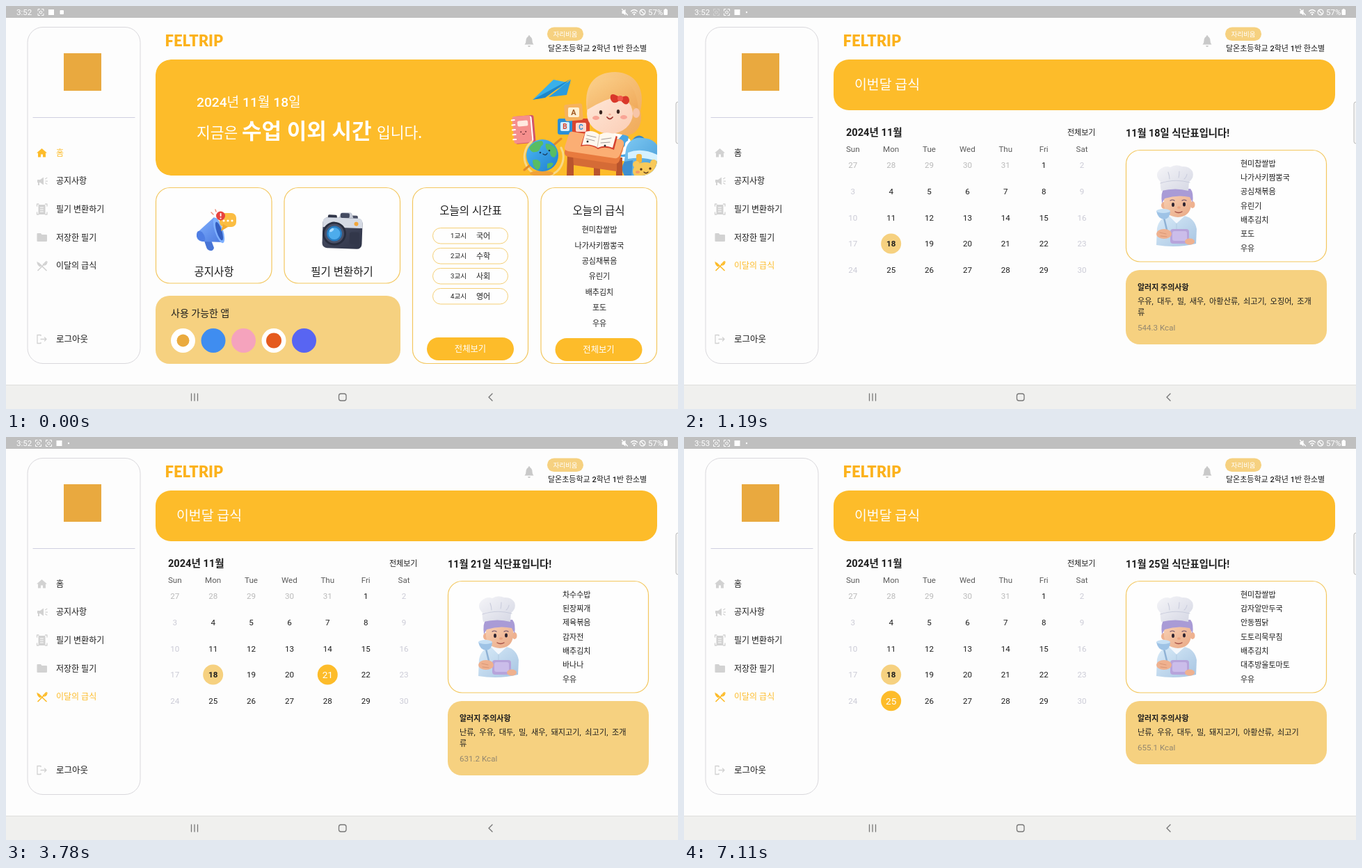
An HTML page for the animation above (7.48 s loop, 966 px wide and 580 px high).

```html
<!DOCTYPE html>
<html lang="ko">
<head>
<meta charset="utf-8">
<title>School tablet</title>
<style>
html, body { margin: 0; width: 100%; height: 100%; overflow: hidden; background: #fdfdfd; }
svg { display: block; width: 966px; height: 580px; }
text { font-family: Roboto, 'Noto Sans CJK KR', 'Noto Sans CJK', sans-serif; white-space: pre; }
</style>
</head>
<body>
<svg id="stage" viewBox="0 0 966 580" xmlns="http://www.w3.org/2000/svg"></svg>
<script>
const LOOP = 7480, OPEN = 1040, FADE = 190;
const GOLD = '#fdbc2a', PALE = '#f6d180', INK = '#1d1d1d', GREY = '#d2d2d2';
const $ = id => document.getElementById(id);

// y is the middle of the line
const txt = (s, x, y, size, fill = INK, weight = 400, anchor = 'start', more = '') =>
  `<text x="${x}" y="${y + size * 0.36}" font-size="${size}" fill="${fill}" font-weight="${weight}" text-anchor="${anchor}" ${more}>${s}</text>`;
const mid = (s, x, y, size, fill, weight) => txt(s, x, y, size, fill, weight, 'middle');
const box = (x, y, w, h, r, fill, stroke = 'none', more = '') =>
  `<rect x="${x}" y="${y}" width="${w}" height="${h}" rx="${r}" fill="${fill}" stroke="${stroke}" ${more}/>`;
const dot = (x, y, r, fill, more = '') => `<circle cx="${x}" cy="${y}" r="${r}" fill="${fill}" ${more}/>`;
const oval = (x, y, a, b, fill, more = '') => `<ellipse cx="${x}" cy="${y}" rx="${a}" ry="${b}" fill="${fill}" ${more}/>`;
const shape = (d, fill, more = '') => `<path d="${d}" fill="${fill}" ${more}/>`;
const line = (d, stroke, w = 1, more = '') =>
  `<path d="${d}" fill="none" stroke="${stroke}" stroke-width="${w}" stroke-linecap="round" stroke-linejoin="round" ${more}/>`;
const group = (id, body, more = '') => `<g id="${id}" ${more}>${body}</g>`;
const grad = (id, a, b) =>
  `<linearGradient id="${id}" x1="0" y1="0" x2="1" y2="1"><stop stop-color="${a}"/><stop offset="1" stop-color="${b}"/></linearGradient>`;

const capture = x =>
  line(`M${x - 4} 7v-2.5h2.5M${x + 4} 7v-2.5h-2.5M${x - 4} 11v2.5h2.5M${x + 4} 11v2.5h-2.5`, '#fff', 1);
const eye = x => `<circle cx="${x}" cy="9" r="1.9" fill="none" stroke="#fff"/>`;

function statusBar() {
  return box(0, 0, 966, 17, 0, '#bfbfbf') +
    txt('3:52', 15, 9, 11.5, '#fff', 400, 'start', 'id="clock"') +
    group('tray0', capture(50) + eye(50) + box(61, 5, 8, 8, 0, '#fff') + box(77.5, 6, 5.5, 6, 1, '#fff')) +
    group('tray1', group('cap', capture(46.5) + eye(46.5)) + capture(61.5) + eye(61.5) +
      box(72.5, 5, 8, 8, 0, '#fff') + dot(90, 9, 1.2, '#fff')) +
    shape('M885.500 7h2l3-2.500v9l-3-2.500h-2z', '#fff') + line('M885.500 4.500l8 8.500', '#fff', 1.1) +
    line('M898.500 7.500q4.500-4 9 0M900.500 10q2.500-2.200 5 0', '#fff', 1.3) + dot(903, 12, 1.2, '#fff') +
    `<circle cx="915" cy="9" r="3.900" fill="none" stroke="#fff" stroke-width="1.200"/>` + line('M912.500 6.500l5 5', '#fff', 1.2) +
    txt('57%', 923, 9, 11.5, '#fff') + box(945.5, 5, 5.5, 8, 1, '#fff') + box(947, 4, 2.5, 2, 0, '#fff');
}

function navBar() {
  return box(0, 545, 966, 35, 0, '#f0f0ee') + line('M0 545.500H966', '#dededc') +
    line('M266.500 558v10M271 558v10M275.500 558v10', '#777', 1.3) +
    box(478.5, 558, 10.5, 10, 3, 'none', '#777', 'stroke-width="1.300"') +
    line('M699 558l-5 5 5 5', '#777', 1.4) +
    box(963, 138, 10, 60, 3, '#f3f3f3', '#bdbdbd');
}

const icons = [
  shape('M51.500 205l7.500 6.500h-2v6h-4v-4h-3v4h-4v-6h-2z', 'currentColor'),
  shape('M45 250h4l5-3.500v11l-5-3.500h-1v4h-2v-4h-1zM56 248.500l3-2 .6 1-3 2zM56.500 251.500h3.500v1.200h-3.500zM56 255l.6-1 3 2-.6 1z', 'currentColor'),
  box(46.5, 286, 10, 14, 1, 'currentColor') + line('M49.500 290h4M49.500 293h4M49.500 296h4', '#fff') +
    line('M44.500 288v-3h2.500M59 288v-3h-2.500M44.500 297v3h2.500M59 297v3h-2.500', 'currentColor', 1.3),
  shape('M44.500 328q0-1 1-1h4.500l1.500 2h6.500q1 0 1 1v8q0 1-1 1h-12.500q-1 0-1-1z', 'currentColor'),
  line('M46 380.500l9-9M47 370l11 10.500', 'currentColor', 1.7) +
    shape('M44.500 367.500l6.500 6-2 2q-5-3-4.500-8z', 'currentColor') +
    line('M53.500 371.500q2 3 5-1M55 370.500l3-3M56.500 371l2.700-2.500', 'currentColor', 1.4),
];
const labels = ['홈', '공지사항', '필기 변환하기', '저장한 필기', '이달의 급식'];

function sidebar() {
  const rows = labels.map((s, i) =>
    `<g id="menu${i}">${icons[i]}${txt(s, 72, 211.5 + i * 40.6, 12, INK)}</g>`).join('');
  return box(31, 30.5, 162, 484, 22, 'none', '#d9d8dc') + line('M39 160.500H185', '#cfcfe0', 1.2) +
    box(83, 68, 54, 54, 0, '#e9a93f') + rows +
    line('M50 474.500v-1h-5v12h5v-1M50 479.500h8M55.500 477l2.500 2.500-2.500 2.500', GREY, 1.3) +
    txt('로그아웃', 72, 479.5, 12.5);
}

function header() {
  return txt('FELTRIP', 228.5, 50, 22, '#fcb21c', 900, 'start', 'style="font-family:Lato,sans-serif"') +
    shape('M745.500 55.500q2-2 2-5.500 0-5.500 4.500-6.500 4.500 1 4.500 6.500 0 3.500 2 5.500z', '#c9c9c9') +
    dot(752, 43.5, 1.3, '#c9c9c9') + shape('M750 57h4q-.5 2-2 2t-2-2z', '#c9c9c9') +
    box(778, 30.5, 52, 19.5, 9.7, PALE) + mid('자리비움', 804, 40.5, 9.5, '#fff', 500) +
    txt('달온초등학교 2학년 1반 한소별', 779, 61, 11, INK, 500);
}

function desk() {
  const plane = shape('M757 135L787 106 812 111z', '#39b0ea') + shape('M757 135L812 105 775 132z', '#1f86c9') +
    shape('M780 131L812 106 806 128z', '#2b9bdc');
  const blocks = box(793, 162, 21, 23, 3, '#2b8fd6') + box(814, 162, 25, 25, 3, '#d8452f') +
    box(803, 141, 26, 24, 3, '#f6b25c', 'none', 'transform="rotate(-5 816 153)"') +
    box(808, 146, 16, 14, 2, '#fff0d2') + box(797, 167, 13, 13, 2, '#d8efff') + box(819, 168, 15, 13, 2, '#ffd9cf') +
    mid('A', 816, 153, 11, '#a25a22', 700) + mid('B', 803.5, 173.5, 10, '#d8452f', 700) + mid('C', 826.5, 174.5, 10, '#2b8fd6', 700);
  const note = `<g transform="rotate(-5 744 178)">${box(731, 158, 29, 40, 3, '#d2566a') + box(732, 159, 25, 37, 3, '#fff') + box(729, 158, 26, 39, 3, '#f58f8d')}
    ${box(736, 165, 15, 8, 2, '#ffe9e0') + line('M728 163h4M728 170h4M728 177h4M728 184h4M728 191h4', '#fff', 2)}${dot(740, 181, 1, '#72323a') + dot(747, 181, 1, '#72323a') + line('M742 184q1.500 1.500 3 0', '#72323a')}</g>`;
  const globe = line('M756 195A28 28 0 1 0 798 204', '#f7d88a', 3) + line('M745 236L798 191', '#e08a2b', 3) +
    oval(770, 241, 17, 4, '#f0a137') + dot(771, 215, 23, 'url(#sea)') +
    shape('M752 204q7-10 18-10 5 4-1 8-2 8-8 8-6 2-9-6zM776 198q9 0 15 8 2 8-3 12-6-1-6-8-8-4-6-12zM757 222q7-3 11 3 1 9-4 11-7-3-7-14zM778 227q7-3 9 0-3 6-9 7z', '#58bd63') +
    dot(768, 211, 1.3, '#183a5c') + dot(781, 208, 1.3, '#183a5c') + line('M772 213q4 3 6-1', '#183a5c', 1.3);
  const girl = shape('M848 190q24-18 49 2l9 31h-56z', '#fff') + shape('M853 187l10 30h27l5-29-8-4-11 13-13-13z', '#4aa5e2') +
    shape('M863 184l12 13 10-13z', '#fff') + shape('M874 190l6 9-5 11-5-11z', '#dc3d32') +
    shape('M836 156C828 114 846 95 876 95 908 96 919 123 912 151 917 172 904 187 891 186L848 178Q838 173 836 156z', 'url(#hair)') +
    oval(868, 155, 33, 29, 'url(#skin)') + shape('M836 149q-2-45 38-46 32 2 35 45-14-5-22-20-25 5-51 21z', 'url(#hair)') +
    oval(906, 154, 5, 7, '#f7c5a8') +
    oval(855, 153, 2.2, 3, '#3a2521') + oval(880, 152, 2.2, 3, '#3a2521') + oval(848, 161, 5, 3, '#f9a596') + oval(888, 160, 5, 3, '#f9a596') +
    line('M864 160q4 5 8 0', '#a63b33', 1.8) + oval(868, 156, 1.8, 1.3, '#f3ad95') +
    shape('M883 132Q867 121 869 134 873 144 883 135 892 147 896 137 896 125 883 132z', '#d9382b') + dot(883, 133, 4, '#f0594a') +
    line('M852 194q-9 3-13 8M895 199q0 9-10 10', '#fff', 10) + dot(841, 199, 5.5, '#fcd3bb') + dot(882, 207, 5.5, '#fcd3bb');
  const table = shape('M807 211h9v33h-10zM845 220h9v24h-9zM877 218h9v26h-9z', '#b9542d') + shape('M815 215l63 9v14l-62-9z', '#d56b36') +
    shape('M815 183l69 11q5 2 4 8l-6 20q-2 6-8 5l-66-10q-6-2-5-7l6-23q1-5 6-4z', '#e87a3e') +
    shape('M815 181l69 11q5 2 4 7l-6 16q-2 5-8 4l-66-10q-6-2-5-6l6-18q1-5 6-4z', '#fbae74') +
    shape('M832 183q12-4 21 3 11-6 26 2l-5 19q-13-6-23-1-10-7-25-4z', '#d5432f') +
    shape('M833 181q11-3 20 4 11-6 24 1l-5 18q-12-5-21 0-9-6-23-4z', '#fff8ee') + line('M853 186l-3 17', '#dcc9b8', 1.3) +
    line('M835 186l13 3M834 191l12 3M856 192l14-2M855 197l13-1', '#a39b98', 1) + dot(836, 195, 1.5, '#333') + dot(861, 201, 1.5, '#333');
  const bag = line('M902 194q8-11 16 0', '#3a86bf', 4) + box(890, 190, 48, 60, 20, 'url(#bag)', 'none', 'transform="rotate(8 914 216)"') +
    shape('M894 211q19-8 42 3l1 10q-20-8-43-4z', '#d5f1ff') + box(906, 213, 8, 13, 3, '#f4b43b') + shape('M889 224q-7 10 1 22h9l2-24z', '#3e8fd0') +
    oval(919, 238, 18, 13, '#f8c95a') + dot(906, 228, 5, '#f8c95a') + dot(931, 226, 5, '#f8c95a') +
    dot(913, 235, 1.7, '#553518') + dot(926, 234, 1.7, '#553518') + line('M917 239q3 3 6 0', '#553518', 1.3) + oval(908, 239, 3, 2, '#f39a68');
  return plane + blocks + note + globe + girl + table + bag;
}

function megaphone() {
  return shape('M284 335l9-3 6 16q-1 5-6 4-4-1-5-5z', '#4774d6') +
    shape('M276 325L299 304q14 10 14 36L283 339q-8-1-9-7 0-5 2-7z', 'url(#horn)') +
    shape('M275 325q5-4 10 5 3 8-1 9-8-1-10-8 0-4 1-6z', '#4f7ee4') +
    oval(306, 323, 6, 19, '#7eb0ff', 'transform="rotate(-18 306 323)"') + oval(306.5, 324, 3.7, 14, '#345fc2', 'transform="rotate(-18 306.500 324)"') +
    box(307, 298, 24, 20, 7, '#fbbd42') + shape('M312 314l-3 10 10-6z', '#f2ab30') +
    dot(313, 309, 1.6, '#fff') + dot(319, 309, 1.6, '#fff') + dot(325, 309, 1.6, '#fff') +
    dot(308.5, 302, 6.5, '#e8433f') + box(307.7, 298, 1.8, 5, 0.8, '#fff') + dot(308.6, 305.5, 1.1, '#fff') +
    line('M298 300l-3-3M302 296l-1-3', '#ee8b76', 1.4);
}

function camera() {
  return `<g transform="rotate(2 483 327)">` + box(462, 301, 13, 8, 2, '#303548') + box(493, 301, 12, 7, 2, '#4a5065') +
    shape('M477 306l3-7q1-2 4-2h9q3 0 4 3l2 7z', '#c5cad6') + box(480, 298, 13, 7, 2, '#434a60') +
    box(455, 305, 57, 44, 7, 'url(#body)') + shape('M455 319v-7q0-7 7-7h43q7 0 7 7v7z', '#d5dae4') +
    dot(472, 328, 17, '#282d3e') + dot(472, 328, 14, '#4a5169') + dot(472, 328, 11, '#267cc1') + dot(472, 328, 8.5, '#4dacec') +
    oval(468, 323, 3.5, 2, '#a8dbff', 'transform="rotate(-40 468 323)"') + dot(503, 313, 3, '#f2a63b') + box(494, 325, 14, 17, 3, '#32374a') + '</g>';
}

function homePage() {
  const card = (x, w, h) => box(x + 0.5, 261.5, w, h, 20, '#fefefe', '#f3c75f', 'stroke-width="1.200"');
  const button = (x, y) => box(x, y, 125, 33, 16.5, GOLD) + mid('전체보기', x + 62.5, y + 16.5, 12.3, '#fff', 500);
  const apps = ['#ffffff', '#3f8df0', '#f5a3bd', '#ffffff', '#5865f2']
    .map((c, i) => dot(254.5 + i * 43.5, 481.5, 17.5, c)).join('');
  return `<g clip-path="url(#banner)">${box(215, 77, 721, 167, 22, GOLD)}${desk()}</g>` +
    txt('2024년 11월 18일', 274, 138, 19.2, '#fff', 500) + txt('지금은', 274, 182, 21.5, '#fff', 500) +
    txt('수업 이외 시간', 339, 179.5, 31, '#fff', 700) + txt('입니다.', 533, 182, 21.5, '#fff', 500) +
    card(215, 166.5, 137.5) + megaphone() + mid('공지사항', 299, 382, 15.5, INK, 500) +
    card(399.5, 166.5, 137.5) + camera() + mid('필기 변환하기', 483, 382, 15.5, INK, 500) +
    box(215, 417, 352, 98, 20, PALE) + txt('사용 가능한 앱', 237, 442, 14, INK, 500) + apps +
    dot(254.5, 481.5, 9, '#eaaa3e') + dot(385, 481.5, 11, '#e55a1e') +
    card(584, 166, 253) + mid('오늘의 시간표', 668, 294, 15.5, INK, 500) +
    ['국어', '수학', '사회', '영어'].map((s, i) => {
      const y = 319.5 + i * 29;
      return box(613.5, y, 108, 22.5, 11.2, '#fefefe', '#f5cf75') +
        txt(i + 1 + '교시', 639, y + 11.2, 9.6) + txt(s, 676, y + 11.2, 11, INK, 500);
    }).join('') + button(605, 477) +
    card(768.5, 166.5, 253) + mid('오늘의 급식', 852, 294, 15.5, INK, 500) +
    days[18].food.split(' ').map((s, i) => mid(s, 853, 322.3 + i * 22.4, 11)).join('') + button(789.5, 478);
}

const days = {
  18: { food: '현미찹쌀밥 나가사키짬뽕국 공심채볶음 유린기 배추김치 포도 우유', kcal: '544.3',
    warn: ['우유, 대두, 밀, 새우, 아황산류, 쇠고기, 오징어, 조개', '류'] },
  19: { food: '기장밥 소고기무국 두부조림 계란말이 깍두기 사과 우유', kcal: '602.4',
    warn: ['난류, 우유, 대두, 밀, 쇠고기'] },
  20: { food: '스파게티 마늘빵 무피클 귤 보코치니샐러드 우유', kcal: '617.0',
    warn: ['난류, 우유, 대두, 밀, 토마토, 아황산류, 닭고기, 쇠고', '기, 조개류'] },
  21: { food: '차수수밥 된장찌개 제육볶음 감자전 배추김치 바나나 우유', kcal: '631.2',
    warn: ['난류, 우유, 대두, 밀, 새우, 돼지고기, 쇠고기, 조개', '류'] },
  22: { food: '찰차조밥 육개장 마늘보쌈 배추겉절이 상추/쌈장 배 우유', kcal: '778.5',
    warn: ['난류, 우유, 대두, 밀, 돼지고기, 아황산류, 쇠고기'] },
  25: { food: '현미찹쌀밥 감자알만두국 안동찜닭 도토리묵무침 배추김치 대추방울토마토 우유', kcal: '655.1',
    warn: ['난류, 우유, 대두, 밀, 돼지고기, 아황산류, 쇠고기'] },
};
// [start, day]
const picks = [[0, 18], [2130, 19], [2840, 20], [3590, 21], [4420, 22], [5910, 25]];

function chef() {
  return shape('M679 344l1-24q3-16 19-18h20q15 3 18 19l-1 21q-28 7-57 2z', 'url(#coat)') +
    shape('M697 302l11 11 12-11z', '#f4f8fd') + line('M708 313v10', '#b4cde2', 1.2) +
    oval(690, 287, 4, 5, '#efb18f') + oval(731, 286, 3.5, 5, '#efb18f') +
    shape('M690 272h39v15q-2 16-19 17-18-1-20-17z', 'url(#face)') +
    shape('M687 284q-2-16 3-21h38q5 6 3 20l-4-8q-18-4-36 2z', '#a99bd6') +
    oval(703, 286, 2, 3, '#2e2430') + oval(719, 285.5, 2, 3, '#2e2430') +
    line('M699 280q3-2 6 0M716 280q3-2 6 0', '#70526b', 1.2) + oval(711.5, 290, 2.5, 1.8, '#eaa481') + line('M706 296q5 3 10 0', '#a45146', 1.4) +
    shape('M686 266q-2-9-1-13-9-9-2-17 8-7 16-4 8-5 17-1 10-1 15 7 3 9-5 15l-1 13q-18-5-39 0z', 'url(#hat)') +
    line('M685 255q21-7 42-1M696 239q2 6 2 10M712 238q0 6-1 9M723 242q-1 5-4 7', '#c9ccdc', 1.1) +
    line('M689 301l6 25', '#8fb2d5', 2.5) + shape('M679 295h20q0 11-9 12-9-1-11-12z', '#9ec3e6') + oval(689, 295, 10, 3, '#c6e0f5') +
    box(699, 321, 27, 21, 4, '#b7a4db') + box(702, 324, 21, 14, 3, '#cbbdea') + oval(690, 328, 11, 7, '#efb18f') +
    line('M684 326l9 2M685 331l9 1', '#d99674', 1) + oval(727, 339, 7, 4.5, '#efb18f');
}

const colX = i => 242.8 + i * 54.87, rowY = i => 229 + i * 37.7;

function calendar() {
  const heads = ['Sun', 'Mon', 'Tue', 'Wed', 'Thu', 'Fri', 'Sat']
    .map((s, i) => mid(s, colX(i), 206.3, 11.6, '#5c5c5c')).join('');
  let cells = '';
  for (let i = 0; i < 35; i++) {
    const x = colX(i % 7), y = rowY(Math.floor(i / 7)), out = i < 5, n = out ? 27 + i : i - 4;
    const rest = i % 7 === 0 || i % 7 === 6, today = !out && n === 18;
    if (today) cells += dot(x, y, 14.5, PALE);
    if (!out && days[n]) cells += dot(x, y, 14.5, GOLD, `id="ring${n}" opacity="0"`);
    cells += txt(n, x, y, 11.6, out ? '#b9b9b9' : rest ? '#cbcbd6' : INK, today ? 700 : 400, 'middle', out ? '' : `id="num${n}"`);
  }
  return heads + cells;
}

function mealPage() {
  return box(215, 77, 721, 73, 22, GOLD) + txt('이번달 급식', 245, 113.5, 19.4, '#fff', 500) +
    txt('2024년 11월', 233, 182, 14.6, INK, 700) + txt('전체보기', 551, 182, 11) + calendar() + group('detail', '');
}

function detail(n) {
  const d = days[n], food = d.food.split(' ');
  const h = food.length > 6 ? 160.5 : 149, top = 207.5 + h + 12, more = (d.warn.length - 1) * 16;
  const first = 207.5 + h / 2 - (food.length - 1) * 10.17;
  return txt(`11월 ${n}일 식단표입니다!`, 635, 183, 14.3, INK, 700) +
    box(635.5, 207.5, 288, h, 20, '#fefefe', '#f3c75f', 'stroke-width="1.200"') +
    `<g transform="translate(0 ${(h - 160.5) / 2})">${chef()}</g>` +
    food.map((s, i) => txt(s, 800, first + i * 20.33, 11)).join('') +
    box(635, top, 289, 91 + more, 20, PALE) + txt('알러지 주의사항', 652, top + 25, 11, INK, 700) +
    d.warn.map((s, i) => txt(s.replace(/, /g, ',\u00a0\u00a0'), 652, top + 45 + i * 16, 11.2)).join('') +
    txt(d.kcal + ' Kcal', 652, top + 67 + more, 11.6, '#93876f');
}

$('stage').innerHTML = '<defs>' + grad('sea', '#4cb9f5', '#1f7fcf') + grad('hair', '#fbd18c', '#f0a95a') +
  grad('skin', '#ffe9da', '#fbcdb5') + grad('bag', '#7cc8f2', '#4397d4') + grad('horn', '#83b3ff', '#4a78df') +
  grad('body', '#4b5168', '#2f3447') + grad('coat', '#d9ebf8', '#a6c4e2') + grad('face', '#f8cfb2', '#e9a986') +
  grad('hat', '#f5f5f8', '#d5d7e4') + '<clipPath id="banner">' + box(215, 77, 721, 167, 22, '#000') + '</clipPath></defs>' +
  box(0, 0, 966, 580, 0, '#fdfdfd') + statusBar() + sidebar() + header() +
  group('home', homePage()) + group('meal', mealPage()) + navBar();

const show = (id, on) => $(id).setAttribute('display', on ? 'inline' : 'none');
const between = (t, a, b) => t >= a && t < b;
let shown = 0;

function tint(i, on) {
  const g = $('menu' + i), label = g.lastElementChild;
  g.setAttribute('color', on ? GOLD : GREY);
  label.setAttribute('fill', on ? GOLD : INK);
  label.setAttribute('font-weight', on ? 500 : 400);
}

function render(t) {
  const open = t >= OPEN;
  show('home', !open);
  show('meal', open);
  labels.forEach((_, i) => tint(i, i === (open ? 4 : 0)));
  show('tray0', t < 300);
  show('tray1', t >= 300);
  const dim = between(t, OPEN, 1560) || between(t, 4300, 4740);
  $('cap').setAttribute('opacity', dim ? 0.35 : 1);
  $('clock').textContent = t < 6000 ? '3:52' : '3:53';

  const now = picks.filter(p => p[0] <= t).length - 1, day = picks[now][1];
  picks.forEach(([start, n], i) => {
    if (!i) return;
    const up = Math.min(1, Math.max(0, (t - start) / FADE));
    const next = picks[i + 1], down = next ? Math.min(1, Math.max(0, (t - next[0]) / FADE)) : 0;
    $('ring' + n).setAttribute('opacity', up - down);
    const num = $('num' + n), on = n === day, size = on ? 13.6 : 11.6;
    num.setAttribute('fill', on ? '#fff' : INK);
    num.setAttribute('font-size', size);
    num.setAttribute('y', rowY(Math.floor((n + 4) / 7)) + size * 0.36);
  });
  if (day !== shown) {
    $('detail').innerHTML = detail(day);
    shown = day;
  }
}

const began = performance.now();
function tick() {
  render((performance.now() - began) % LOOP);
  requestAnimationFrame(tick);
}
tick();
</script>
</body>
</html>
```
